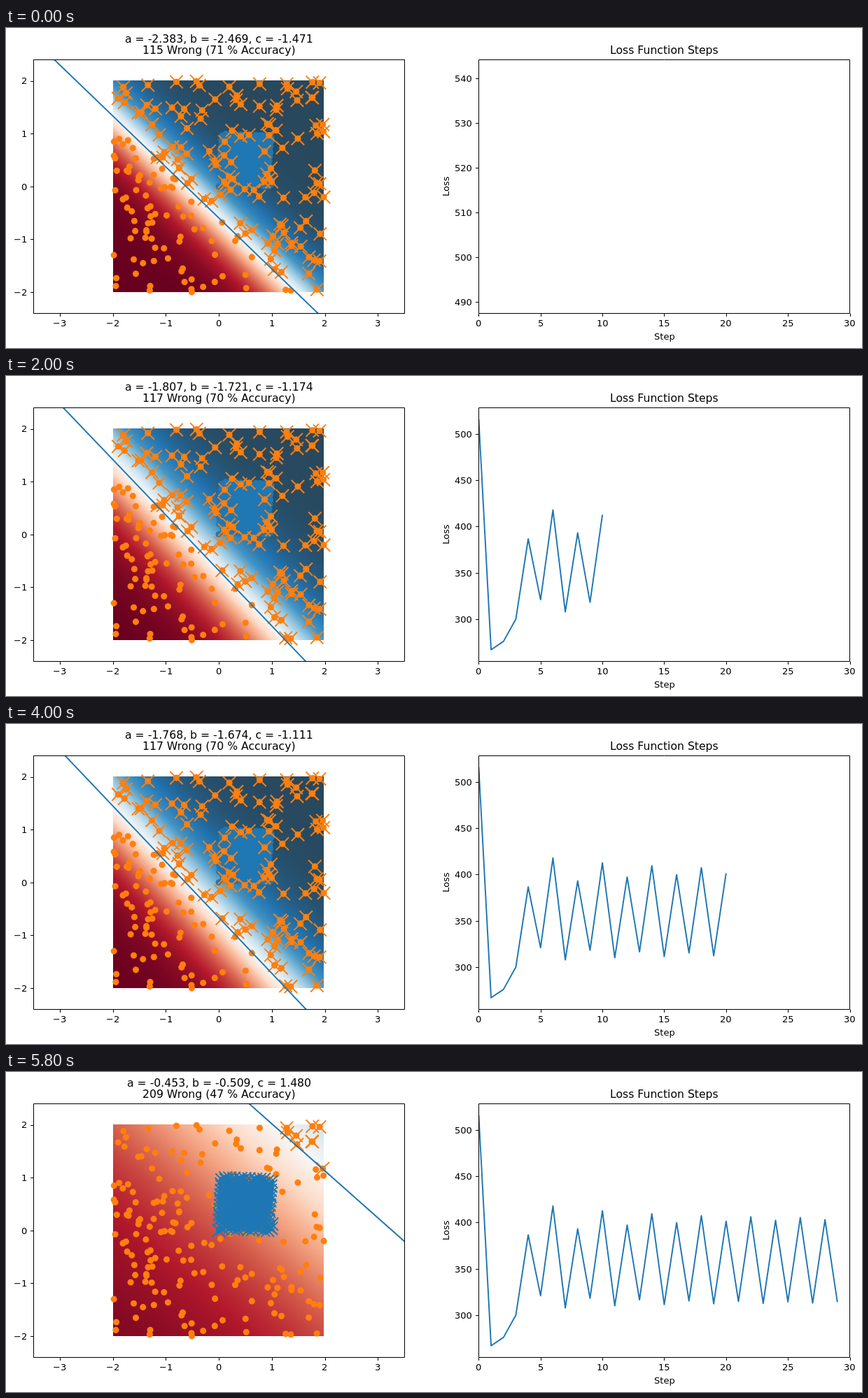
These frames come from a looping animation (1223x458 px, 6000 ms). An HTML page with a canvas:

```html
<!DOCTYPE html>
<html lang="en">
<head>
<meta charset="utf-8">
<title>Loss Function Steps</title>
<style>
html, body { margin: 0; width: 100%; height: 100%; overflow: hidden; background: #fff; }
canvas { display: block; }
</style>
</head>
<body>
<canvas id="stage" width="1223" height="458"></canvas>
<script>
const ctx = document.getElementById('stage').getContext('2d');
const BLUE = '#1f77b4', ORANGE = '#ff7f0e';
const STEP_MS = 200, STEPS = 30;
const TOP = 45.3, BOTTOM = 408.3, MID = 226.8;
const OX = 304.1, SX = 75.75, SY = 75.63;
const LEFT = 675.4, STEP_W = 17.67;
const LINE = 1.96;
const SMALL = '13.06px "DejaVu Sans", sans-serif';
const LARGE = '15.67px "DejaVu Sans", sans-serif';
const RAMP = ['#67001f', '#b2182b', '#d6604d', '#f4a582', '#fddbc7', '#f7f7f7',
  '#d1e5f0', '#92c5de', '#4393c3', '#2173b0', '#28485d'];

const px = x => OX + x * SX;
const py = y => MID - y * SY;

// States are [a, b, c, wrong points]
const START = [-2.383, -2.469, -1.471, 115];
const EVEN = [-1.7775, -1.6855, -1.124, 117];
const ODD = [-0.4546, -0.5109, 1.4784, 209];
const WOBBLE = [0.0455, 0.0555, 0.086];
const DECAY = [0.8, 0.8, 0.76];

const swing = (k, rate) => (-rate) ** ((k - (k % 2 ? 5 : 6)) / 2);

// The descent builds up to a damped two-state oscillation
function model(k) {
  if (k === 0) return START;
  const limit = k % 2 ? ODD : EVEN;
  if (k < 4) {
    return limit.map((v, i) => {
      const mid = (EVEN[i] + ODD[i]) / 2;
      return mid + (v - mid) * k / 4;
    });
  }
  const side = k % 2 ? 0.5 : -1;
  const state = WOBBLE.map((w, i) => limit[i] + side * w * swing(k, DECAY[i]));
  return [...state, limit[3] + (k % 2 ? 0 : Math.trunc(2 * swing(k, 0.8) ** 3))];
}

function loss(k) {
  if (k < 4) return [515.8, 267, 276, 300][k];
  return k % 2 ? 313.7 + 7.3 * swing(k, 0.79) : 404 + 13.8 * swing(k, 0.79);
}

const score = ([a, b, c], [x, y]) => a * x + b * y + c;

function random(seed) {
  return () => {
    seed = (seed + 0x6D2B79F5) | 0;
    let t = Math.imul(seed ^ (seed >>> 15), 1 | seed);
    t = (t + Math.imul(t ^ (t >>> 7), 61 | t)) ^ t;
    return ((t ^ (t >>> 14)) >>> 0) / 4294967296;
  };
}

// A few outlying points, then random ones on each side of the two lines
const outer = [
  [-0.8, 1.98], [-0.42, 1.99], [0.77, 1.94], [1.9, 1.96], [1.28, 1.94], [-1.8, 1.88],
  [-1.36, 1.54], [-1.03, 0.65], [-0.6, 1.1], [1.18, -1.62], [0.5, -0.89], [1.37, -1.07],
  [1.98, -0.2], [1.85, -1.95], [-0.51, -2], [-1.98, -1.3], [-1.98, 0.58], [-1.88, 0.9]
];
const rnd = random(7);
function fill(count, test) {
  let need = count - outer.filter(test).length;
  while (need > 0) {
    const p = [rnd() * 3.96 - 1.98, rnd() * 3.96 - 1.98];
    if (test(p)) {
      outer.push(p);
      need--;
    }
  }
}
const before = p => score(START, p) > 0;
const beyond = p => score(ODD, p) < 0;
fill(85, before);
fill(9, beyond);
fill(106, p => !before(p) && !beyond(p));

const inner = Array.from({ length: 200 }, (_, i) => [(i * 0.7549) % 1, (i * 0.5698) % 1]);

function text(s, x, y, font = SMALL, align = 0.5) {
  ctx.font = font;
  ctx.fillStyle = '#000';
  ctx.fillText(s, Math.round(x - ctx.measureText(s).width * align), Math.round(y));
}

function stroke(points, color, width) {
  ctx.beginPath();
  points.forEach(([x, y]) => ctx.lineTo(x, y));
  ctx.strokeStyle = color;
  ctx.lineWidth = width;
  ctx.lineJoin = 'round';
  ctx.stroke();
}

const crisp = v => Math.round(v) + 0.5;
const label = v => String(v).replace('-', '\u2212');

function tickX(x, v) {
  stroke([[crisp(x), 408.5], [crisp(x), 413]], '#000', 1);
  text(label(v), x, 427);
}

function tickY(left, y, v) {
  stroke([[left, crisp(y)], [left - 4.5, crisp(y)]], '#000', 1);
  text(label(v), left - 9.2, y + 4.8, SMALL, 1);
}

function axes(x, draw) {
  ctx.save();
  ctx.beginPath();
  ctx.rect(x, TOP, 530, BOTTOM - TOP);
  ctx.clip();
  draw();
  ctx.restore();
  ctx.strokeStyle = '#000';
  ctx.lineWidth = 1;
  ctx.strokeRect(x, 45.5, 530, 363);
}

function shade(z) {
  const t = 10 - 10 / (1 + Math.exp(-z));
  const i = Math.min(9, Math.floor(t));
  const part = (hex, j) => parseInt(hex.substr(1 + 2 * j, 2), 16);
  const mix = [0, 1, 2].map(j => {
    const v = part(RAMP[i], j);
    return Math.round(v + (part(RAMP[i + 1], j) - v) * (t - i));
  });
  return `rgb(${mix})`;
}

function field([a, b, c]) {
  const n = a * a + b * b;
  const at = z => [px((z - c) * a / n), py((z - c) * b / n)];
  const g = ctx.createLinearGradient(...at(8), ...at(-8));
  for (let i = 0; i <= 80; i++) g.addColorStop(i / 80, shade(8 - i / 5));
  ctx.fillStyle = g;
  ctx.fillRect(153, 75, 301, 303);
}

function dots(points, color) {
  ctx.fillStyle = color;
  ctx.beginPath();
  for (const [x, y] of points) {
    ctx.moveTo(px(x) + 4.57, py(y));
    ctx.arc(px(x), py(y), 4.57, 0, 7);
  }
  ctx.fill();
}

function crosses(points, color) {
  const r = 9.2;
  for (const p of points) {
    const x = px(p[0]), y = py(p[1]);
    stroke([[x - r, y - r], [x + r, y + r]], color, LINE);
    stroke([[x - r, y + r], [x + r, y - r]], color, LINE);
  }
}

function drawModel(k) {
  const state = model(k);
  const [a, b, c] = state;
  const wrong = Math.round(state[3]);
  const edge = x => [px(x), py(-(a * x + c) / b)];
  axes(39.5, () => {
    field(state);
    dots(inner, BLUE);
    dots(outer, ORANGE);
    crosses(outer.filter(p => score(state, p) < 0), ORANGE);
    crosses(inner.filter(p => score(state, p) > 0), BLUE);
    stroke([edge(-4), edge(4)], BLUE, LINE);
  });
  for (let v = -3; v <= 3; v++) tickX(px(v), v);
  for (let v = -2; v <= 2; v++) tickY(39.5, py(v), v);
  const f = v => v.toFixed(3);
  text(`a = ${f(a)}, b = ${f(b)}, c = ${f(c)}`, OX, 21, LARGE);
  text(`${wrong} Wrong (${Math.floor((400 - wrong) / 4)} % Accuracy)`, OX, 37, LARGE);
}

function drawLoss(k) {
  const hi = k ? loss(0) : loss(0) * 1.05;
  const lo = k ? loss(1) : loss(0) * 0.95;
  const unit = (BOTTOM - TOP) / 1.1 / (hi - lo);
  const lx = s => LEFT + s * STEP_W;
  const ly = v => MID - (v - (hi + lo) / 2) * unit;
  axes(675.5, () => {
    const path = Array.from({ length: k + 1 }, (_, i) => [lx(i), ly(loss(i))]);
    if (k) stroke(path, BLUE, LINE);
  });
  for (let s = 0; s <= 30; s += 5) tickX(lx(s), s);
  const [first, last, gap] = k ? [300, 500, 50] : [490, 540, 10];
  for (let v = first; v <= last; v += gap) tickY(675.5, ly(v), v);
  text('Loss Function Steps', 940.4, 37, LARGE);
  text('Step', 940.4, 446);
  ctx.save();
  ctx.translate(633, 227);
  ctx.rotate(-Math.PI / 2);
  text('Loss', 0, 0);
  ctx.restore();
}

let shown = -1;
const t0 = performance.now();
function tick() {
  const k = Math.floor((performance.now() - t0) / STEP_MS) % STEPS;
  if (k !== shown) {
    shown = k;
    ctx.fillStyle = '#fff';
    ctx.fillRect(0, 0, 1223, 458);
    drawModel(k);
    drawLoss(k);
  }
  requestAnimationFrame(tick);
}
tick();
</script>
</body>
</html>
```
